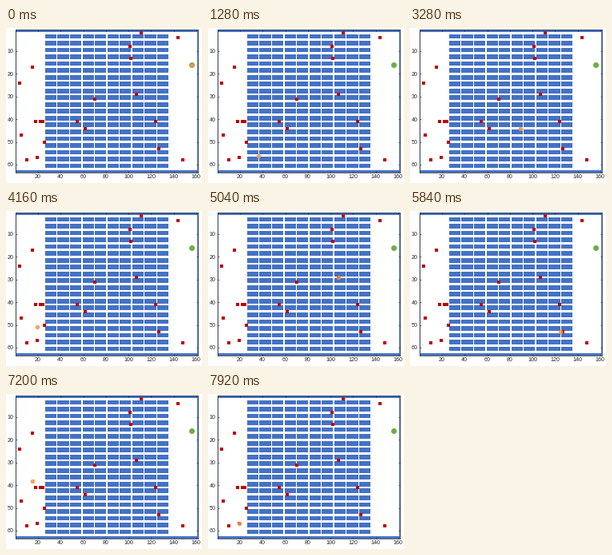
Animation of 245x194 px, one loop 8 s. Source, as a matplotlib script:

```python
import numpy as np
import matplotlib.pyplot as plt
from matplotlib.animation import FuncAnimation
from matplotlib.colors import ListedColormap

W, H, DPI = 245, 194, 100
COLS, ROWS = 161, 63
LEFT, TOP, CELL_W, CELL_H = 12.4, 2.0, 1.414, 2.84
FRAMES, INTERVAL, SPEED = 100, 80, 10  # SPEED: cells per frame

BLUE, RED, GREEN, ORANGE = "#4472c4", "#c00000", "#70ad47", "#f2964a"
INK = "#262626"

STATIONS = [
    (111, 2), (144, 4), (101, 8), (102, 13), (15, 17), (4, 24), (107, 29),
    (70, 31), (18, 41), (22, 41), (24, 41), (55, 41), (124, 41), (62, 44),
    (5, 47), (26, 50), (127, 53), (19, 57), (10, 58), (148, 58),
]
GOAL = (156, 16)

# Each trip: corner points, then how many extra steps the robot rests.
TRIPS = [
    ([(156, 16), (156, 56), (10, 56), (10, 58)], 0),
    ([(10, 58), (24, 58), (24, 23), (103, 23), (103, 2), (111, 2)], 1),
    ([(111, 2), (103, 2), (103, 44), (24, 44), (24, 58), (10, 58)], 1),
    ([(10, 58), (12, 58), (12, 51), (24, 51), (24, 47), (103, 47),
      (103, 29), (107, 29)], 1),
    ([(107, 29), (114, 29), (114, 41), (136, 41), (136, 58), (148, 58)], 1),
    ([(148, 58), (148, 53), (125, 53), (125, 41), (11, 41), (11, 58),
      (10, 58)], 1),
    ([(10, 58), (10, 50), (15, 50), (15, 17)], 1),
    ([(15, 17), (15, 50), (10, 50), (10, 58)], 12),
    ([(10, 58), (10, 57), (19, 57)], 10),
]


def walk(trips):
    """List every cell the robot occupies, one per step."""
    cells = [trips[0][0][0]]
    for corners, rest in trips:
        for (x0, y0), (x1, y1) in zip(corners, corners[1:]):
            steps = abs(x1 - x0) + abs(y1 - y0)
            dx, dy = np.sign(x1 - x0), np.sign(y1 - y0)
            cells += [(x0 + dx * k, y0 + dy * k) for k in range(1, steps + 1)]
        cells += [corners[-1]] * rest
    return cells


def warehouse():
    """Outer walls plus a 10 by 20 block of shelves."""
    grid = np.zeros((ROWS, COLS))
    grid[[0, -1], :] = 1
    grid[:, [0, -1]] = 1
    for row in range(2, 61, 3):
        for col in range(26, 135, 11):
            grid[row:row + 2, col:col + 10] = 1
    return grid


def pt(px):
    return px * 72 / DPI


fig = plt.figure(figsize=(W / DPI, H / DPI), dpi=DPI, facecolor="white")
width, height = COLS * CELL_W, ROWS * CELL_H
ax = fig.add_axes([LEFT / W, 1 - (TOP + height) / H, width / W, height / H])
ax.imshow(warehouse(), cmap=ListedColormap(["white", BLUE]), aspect="auto",
          interpolation="nearest",
          extent=(0.5, COLS + 0.5, ROWS + 0.5, 0.5))

ax.set_xticks(range(20, 161, 20))
ax.set_yticks(range(10, 61, 10))
ax.tick_params(direction="in", length=pt(2), width=pt(0.6), pad=pt(2.5),
               top=True, right=True, color=INK, labelcolor=INK,
               labelsize=pt(7.2), labelfontfamily="Liberation Sans")
for spine in ax.spines.values():
    spine.set(linewidth=pt(0.7), color=INK)


def dots(points, marker, size, color, **style):
    xs, ys = zip(*points)
    line, = ax.plot(xs, ys, marker, ms=pt(size), color=color, mew=0,
                    clip_on=False, **style)
    return line


dots(STATIONS, "s", 4.2, RED, zorder=3)
dots([GOAL], "o", 7, GREEN, zorder=3)
robot = dots([GOAL], "o", 5.6, ORANGE, alpha=0.85, zorder=4)

track = walk(TRIPS)


def update(frame):
    x, y = track[frame * SPEED]
    robot.set_data([x], [y])
    return robot,


anim = FuncAnimation(fig, update, frames=FRAMES, interval=INTERVAL,
                     repeat=True, repeat_delay=0)
plt.show()
```
